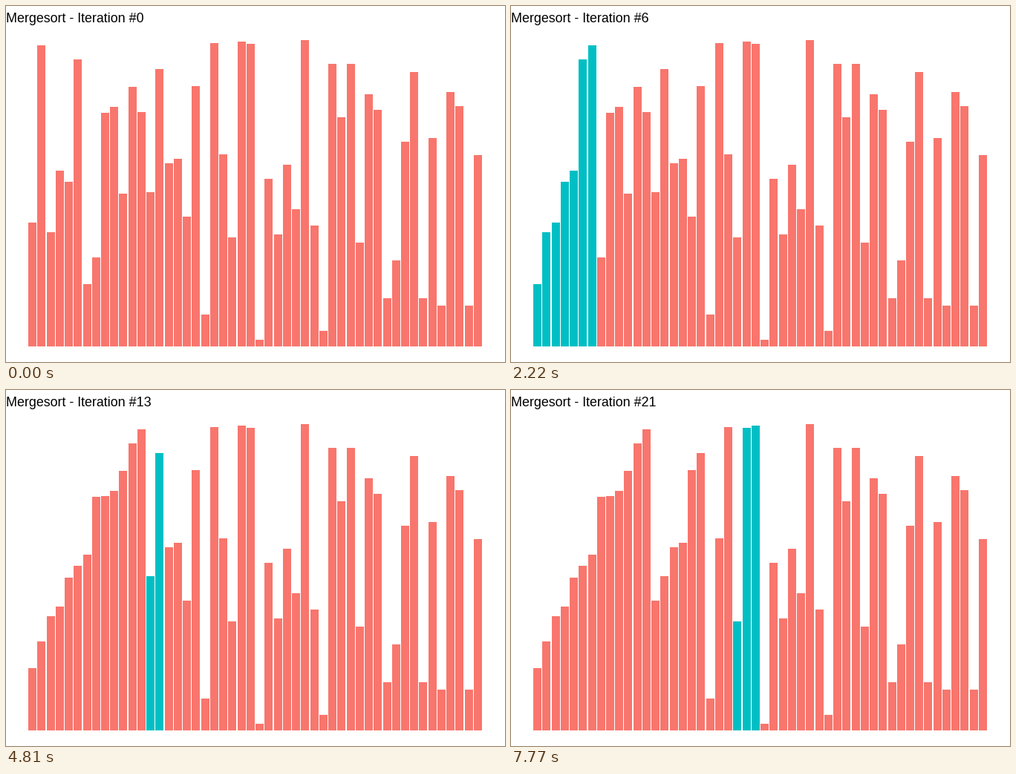
A matplotlib script for the animation above (8000 ms loop, 672 px wide and 480 px high).

```python
import math

import matplotlib.pyplot as plt
from matplotlib.animation import FuncAnimation

W, H, DPI = 672, 480, 96
LOOP, TICK, STEP = 8000, 20, 370
BASE = 459
CORAL, TEAL = "#F8766D", "#00BFC4"

# Top edge of each bar, in pixels from the top of the stage.
TOPS = [
    292, 53, 305, 222, 237, 72, 375, 339, 144, 136,
    253, 109, 143, 251, 85, 212, 206, 284, 108, 416,
    50, 200, 312, 48, 51, 450, 233, 308, 214, 274,
    46, 296, 438, 78, 150, 78, 319, 119, 140, 394,
    343, 183, 89, 394, 178, 404, 116, 135, 404, 201,
]


def merges(vals, lo, hi):
    """Sort vals[lo:hi] in place, yielding the range after every merge."""
    if hi - lo < 2:
        return
    mid = (lo + hi + 1) // 2
    yield from merges(vals, lo, mid)
    yield from merges(vals, mid, hi)
    vals[lo:hi] = sorted(vals[lo:hi])
    yield lo, hi


def sort_states(heights):
    vals = list(heights)
    states = [(list(vals), 0, 0)]
    for lo, hi in merges(vals, 0, len(vals)):
        states.append((list(vals), lo, hi))
    return states


def bar_edges(n, width=0.9):
    """Pixel columns of n bars with a 5 % margin on either side."""
    span = n - 1 + width
    pitch = W / (1.1 * span)
    left = 0.05 * span * pitch
    starts = [left + i * pitch for i in range(n)]
    return [(math.floor(x), math.floor(x + width * pitch)) for x in starts]


states = sort_states([BASE - top for top in TOPS])
edges = bar_edges(len(TOPS))

fig = plt.figure(figsize=(W / DPI, H / DPI), dpi=DPI, facecolor="white")
ax = fig.add_axes([0, 0, 1, 1])
ax.axis("off")

bars = ax.bar(
    [a for a, _ in edges],
    states[0][0],
    width=[b - a for a, b in edges],
    bottom=H - BASE,
    align="edge",
    color=CORAL,
    linewidth=0,
)
ax.set_xlim(0, W)
ax.set_ylim(0, H)
title = ax.text(0, H - 22, "", family="Liberation Sans", size=13.4,
                color="black", va="baseline")


def draw(frame):
    step = (frame * TICK + TICK // 2) // STEP
    heights, lo, hi = states[step]
    for i, (bar, height) in enumerate(zip(bars, heights)):
        bar.set_height(height)
        bar.set_facecolor(TEAL if lo <= i < hi else CORAL)
    title.set_text(f"Mergesort - Iteration #{step}")
    return [*bars, title]


anim = FuncAnimation(fig, draw, frames=LOOP // TICK, interval=TICK,
                     init_func=lambda: draw(0), repeat=True, repeat_delay=0)
plt.show()
```
